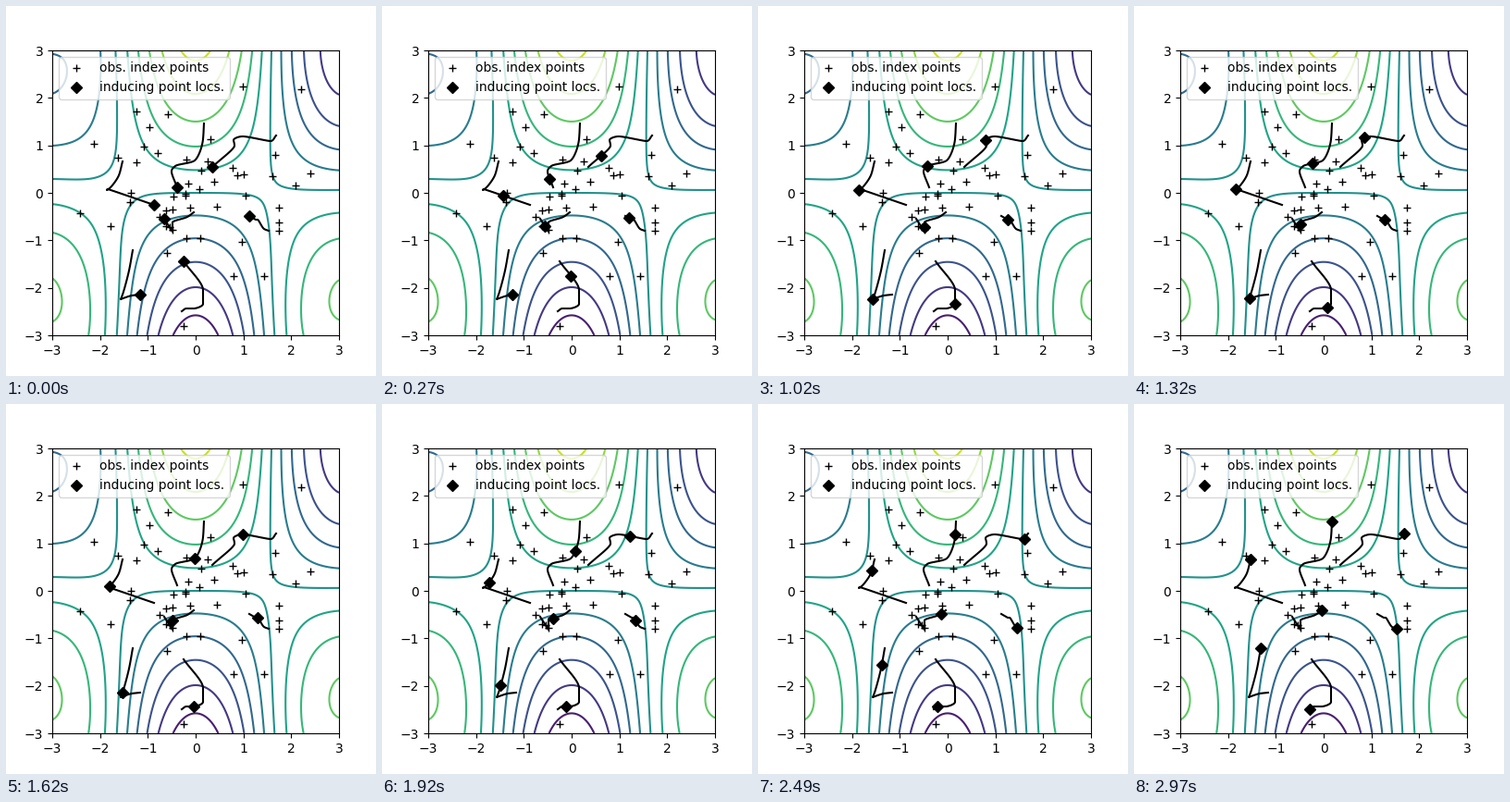
Animation of 400x400 px, one loop 3000 ms. Source, as a matplotlib script:

```python
import numpy as np
import matplotlib.pyplot as plt
from matplotlib.animation import FuncAnimation

FRAMES, INTERVAL = 100, 30

# Key positions of the inducing points, in stage pixels, at the frames in KEYS
KEYS = np.array([0, 19, 34, 54, 79, 99])
TRACKS = np.array([
    [(160, 215), (110, 198), (109, 199), (112, 197), (122, 183), (126, 168)],
    [(185, 196), (179, 179), (183, 173), (204, 167), (213, 144), (214, 127)],
    [(171, 230), (180, 244), (180, 239), (180, 234), (196, 228), (203, 223)],
    [(223, 174), (247, 151), (246, 145), (256, 141), (286, 146), (292, 140)],
    [(263, 227), (270, 231), (270, 231), (272, 231), (279, 241), (284, 243)],
    [(192, 276), (213, 307), (213, 322), (203, 327), (195, 327), (190, 330)],
    [(145, 312), (136, 313), (124, 317), (126, 312), (133, 286), (137, 264)],
])

# Outlying observations; the rest form a random cloud
OUTLIERS = [(-2.13, 1.03), (-2.42, -.43), (-1.78, -.7), (-.58, 1.66), (.99, 2.24),
            (2.21, 2.18), (2.4, .41), (2.09, .16), (1.66, .8), (1.74, -.8),
            (1.01, .39), (-.25, -2.81)]


def to_data(p):
    return (p - np.array([205, 202])) / np.array([51.667, -51.333])


def smooth_path(t, keys, pts):
    """Cubic path through pts that never overshoots them."""
    h = np.diff(keys)[:, None]
    sec = np.diff(pts, axis=0) / h
    a, b = sec[:-1], sec[1:]
    same = a * b > 0
    inner = np.where(same, 2 * a * b / np.where(same, a + b, 1), 0)
    m = np.vstack([sec[:1], inner, sec[-1:]])
    i = np.clip(np.searchsorted(keys, t, side="right") - 1, 0, len(keys) - 2)
    u, h = (t - keys[i])[:, None] / h[i], h[i]
    return ((1 + 2 * u) * (1 - u) ** 2 * pts[i] + u * (1 - u) ** 2 * h * m[i]
            + u ** 2 * (3 - 2 * u) * pts[i + 1] - u ** 2 * (1 - u) * h * m[i + 1])


def half_waves(y, zero, low, high):
    """Sine arcs on both sides of a zero; low and high are (y, value) extremes."""
    def arc(peak):
        return peak[1] * np.sin(np.pi / 2 * (y - zero) / (peak[0] - zero))
    return np.where(y < zero, arc(low), arc(high))


def bump(x, y, cx, cy):
    return np.exp(-((x - cx) ** 2 + (y - cy) ** 2) / .5)


def surface(x, y):
    """Roughly 2 y cos(x), with its own profile along the left and right edges."""
    mid = 2.1 * y - .02 * y ** 2 - .032 * y ** 3
    left = half_waves(y, .29, (-2.25, 3.15), (2.5, -2.1))
    right = half_waves(y, .06, (-2.25, 3.15), (3, -4.6))
    edge = ((1 - np.cos(x)) / 2) ** 3
    return (np.cos(x) * mid + edge * (np.where(x < 0, left, right) + mid)
            + .12 * bump(x, y, -1.7, 0) + .07 * bump(x, y, 1.6, -.3))


fig, ax = plt.subplots(figsize=(4, 4), dpi=100)
grid = np.linspace(-3, 3, 201)
X, Y = np.meshgrid(grid, grid)
ax.contour(X, Y, surface(X, Y), levels=np.arange(-6, 7), cmap="viridis")

rng = np.random.default_rng(4)
cloud = np.clip(rng.normal((.1, -.2), (.9, .85), (38, 2)), -1.75, 1.75)
obs = np.vstack([OUTLIERS, cloud])
ax.plot(*obs.T, "k+", label="obs. index points")

t = np.arange(FRAMES)
paths = np.array([smooth_path(t, KEYS, to_data(p)) for p in TRACKS])
for path in paths:
    ax.plot(*path.T, "k-")
points, = ax.plot([], [], "kD", label="inducing point locs.")
ax.set(xlim=(-3, 3), ylim=(-3, 3), xticks=range(-3, 4), yticks=range(-3, 4))
ax.legend(loc="upper left")


def update(i):
    points.set_data(paths[:, i, 0], paths[:, i, 1])
    return points,


anim = FuncAnimation(fig, update, frames=FRAMES, interval=INTERVAL, repeat_delay=0)
plt.show()
```
